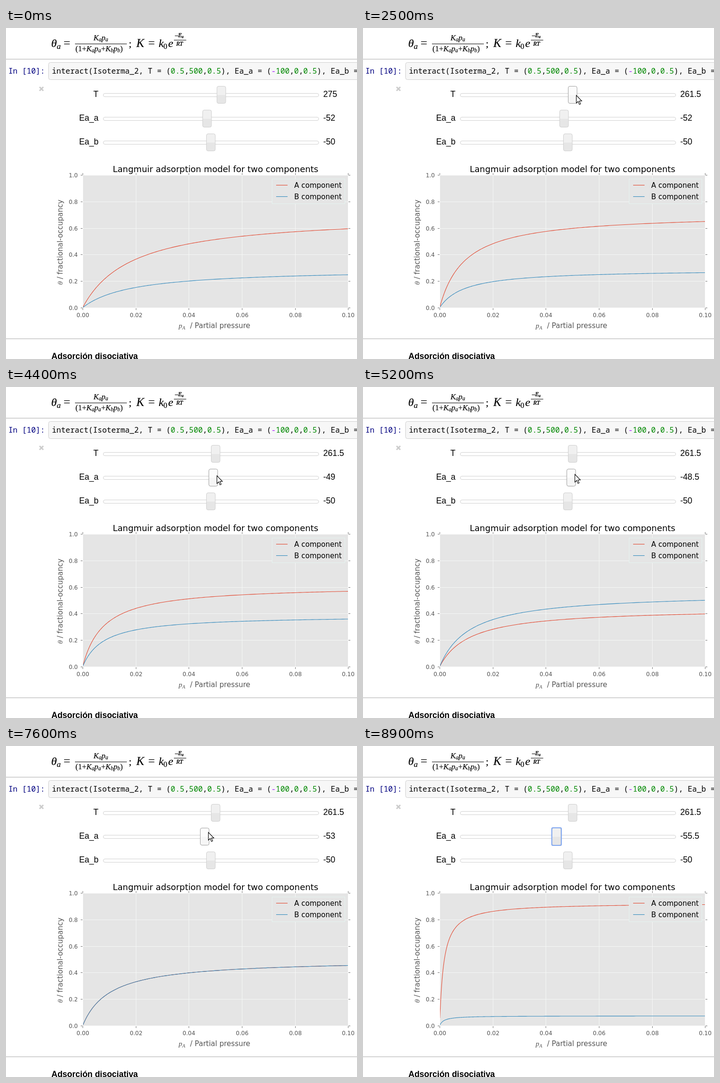
An HTML page for the animation above (9300 ms loop, 738x696 px).

```html
<!DOCTYPE html>
<html lang="es">
<head>
<meta charset="utf-8">
<title>Langmuir adsorption</title>
<style>
html, body { margin: 0; width: 100%; height: 100%; overflow: hidden; background: #fff; }
svg { display: block; width: 738px; height: 696px; }
text { white-space: pre; }
.math { font-family: "Liberation Serif", serif; }
.math .i, .math.i { font-style: italic; }
.math .sub { font-size: 70%; }
.code { font: 16.03px "Noto Sans Mono", monospace; }
.num { fill: #080; }
.op { fill: #a2f; }
.ui { font: 17.5px "Liberation Sans", sans-serif; }
.plot { font-family: "DejaVu Sans", sans-serif; fill: #555; }
.tick { font-size: 12px; }
.name { font-size: 15px; }
.grid { stroke: #f5f7f6; }
.mark { stroke: #777; }
.curve { fill: none; stroke-width: 1.1; stroke-linejoin: round; }
.red { stroke: #e24a33; }
.blue { stroke: #348abd; }
.track { fill: #fff; stroke: #d0d0d0; }
.knob .top { fill: #f0f0f0; }
.knob .low { fill: #e6e6e6; }
.knob .edge { fill: none; stroke: #cfcfcf; }
.knob .ring { fill: none; stroke: #7fa6f0; stroke-width: 2; visibility: hidden; }
.hover .top { fill: #fcfcfc; }
.hover .low { fill: #f6f6f6; }
.hover .edge { stroke: #a0a0a0; }
.focus .ring { visibility: visible; }
</style>
</head>
<body>
<svg viewBox="0 0 738 696">
  <clipPath id="area"><rect x="162" y="310" width="557" height="278"/></clipPath>

  <g class="math" stroke="#000" stroke-width=".15">
    <text x="95" y="40" font-size="24" class="i">θ<tspan class="sub" dy="4">a</tspan></text>
    <text x="121" y="40" font-size="25">=</text>
    <text x="184" y="26" font-size="16.5" class="i">K<tspan class="sub" dy="2">a</tspan><tspan dy="-2">p</tspan><tspan class="sub" dy="2">a</tspan></text>
    <path d="M145 33.5H254" stroke-width="1.2"/>
    <text x="146" y="49" font-size="16.5">(1+<tspan class="i">K<tspan class="sub" dy="2">a</tspan><tspan dy="-2">p</tspan><tspan class="sub" dy="2">a</tspan></tspan><tspan dy="-2">+</tspan><tspan class="i">K<tspan class="sub" dy="2">b</tspan><tspan dy="-2">p</tspan><tspan class="sub" dy="2">b</tspan></tspan><tspan dy="-2">)</tspan></text>
    <text x="258" y="40" font-size="22">;</text>
    <text x="274" y="40" font-size="25" class="i">K</text>
    <text x="299" y="40" font-size="25">=</text>
    <text x="321" y="40" font-size="24" class="i">k</text>
    <text x="331" y="44" font-size="16">0</text>
    <text x="341" y="40" font-size="24" class="i">e</text>
    <path d="M355 16.5H362M353 25.5H379" stroke-width="1"/>
    <text x="362" y="19" font-size="12" class="i" stroke-width=".4">E<tspan class="sub" dy="2">a</tspan></text>
    <text x="358" y="37" font-size="12" class="i" stroke-width=".4">RT</text>
  </g>

  <path d="M0 65.5H738M0 653.5H738" stroke="#ababab"/>
  <rect x="89.5" y="72.5" width="680" height="36" rx="4" fill="#f7f7f7" stroke="#cfcfcf"/>
  <text class="code" x="5" y="96" fill="#000080">In [10]:</text>
  <text class="code" x="96.5" y="96">interact(Isoterma_2, T = (<tspan class="num">0.5</tspan>,<tspan class="num">500</tspan>,<tspan class="num">0.5</tspan>), Ea_a = (<tspan class="op">-</tspan><tspan class="num">100</tspan>,<tspan class="num">0</tspan>,<tspan class="num">0.5</tspan>), Ea_b =</text>
  <path d="M70.5 124L78.5 132M78.5 124L70.5 132" stroke="#ccc" stroke-width="3"/>

  <g id="sliders"></g>

  <g class="plot">
    <text x="440.5" y="303" font-size="17.9" text-anchor="middle" fill="#000">Langmuir adsorption model for two components</text>
    <rect x="162" y="310" width="557" height="278" fill="#e5e5e5"/>
    <g id="axes"></g>
    <text x="363" y="631" class="math i" font-size="15">p<tspan class="sub" dy="3">A</tspan></text>
    <text x="387" y="631" class="name">/ Partial pressure</text>
    <g transform="translate(119 540) rotate(-90)">
      <text class="math i" font-size="15">θ</text>
      <text x="12" class="name">/ fractional-occupancy</text>
    </g>
    <g clip-path="url(#area)">
      <path id="curveA" class="curve red"/>
      <path id="curveB" class="curve blue"/>
    </g>
    <rect x="559.5" y="317.5" width="153" height="52" fill="#e5e5e5" stroke="#e6f3f0"/>
    <path class="curve red" d="M568 330.5H592"/>
    <path class="curve blue" d="M568 354.5H592"/>
    <g class="name" fill="#000">
      <text x="606" y="336">A component</text>
      <text x="606" y="360">B component</text>
    </g>
  </g>

  <text class="ui" x="95.5" y="696" style="font-weight:bold">Adsorción disociativa</text>
  <path id="cursor" d="M0 0V16.5L3.8 13L6.4 19.4L9 18.3L6.4 12H11.5Z" fill="#fff" stroke="#000" stroke-width="1.1"/>
</svg>
<script>
const LOOP = 9300, STEP = 100, R = 8.314e-3, K0 = 5e-9;
const PLOT = { x: 161.2, y: 588, w: 558, h: 279 };
const $ = id => document.getElementById(id);

const clamp = (v, lo, hi) => Math.min(hi, Math.max(lo, v));
const half = v => Math.round(v * 2) / 2;
const mix = (a, b, u) => a + (b - a) * u;
const ramp = (t, from, to) => clamp((t - from) / (to - from), 0, 1);
const easeOut = u => 1 - (1 - u) ** 2;

// Slider values
const temperature = t => half(mix(275, 261.5, ramp(t, 970, 1875)));
const energy = t => half(-52 + 3.5 * easeOut(ramp(t, 3600, 5000)) - 7 * ramp(t, 6600, 8156));

// The plot trails the sliders: three slow redraws, then queued half-unit steps
const plotTemperature = t => [275, 271.5, 267, 261.5][clamp(Math.floor((t - 800) / 700), 0, 3)];
const plotEnergy = t => -52
  + clamp(Math.floor((t - 3900) / 250), 0, 7) / 2
  - clamp(Math.floor((t - 7200) / 115), 0, 14) / 2;

const temperatureX = v => Math.round(443 + (v - 275) * .907);
const energyX = v => Math.round(412.6 + (v + 52) * 4.53);

// The pointer holds a handle while dragging and glides in between
function pointer(t) {
  const onT = [temperatureX(temperature(t)) + 16, 141];
  const onEa = [energyX(energy(t)) + 17.5, 189 - 8 * easeOut(ramp(t, 3600, 7600))];
  const glide = (a, b, from, to) => a.map((v, i) => mix(v, b[i], ramp(t, from, to)));
  const rest = [457, 142];
  if (t < 1000) return glide([602, 83], onT, 200, 900);
  if (t < 3200) return glide(onT, rest, 2400, 3000);
  if (t < 3600) return glide(rest, onEa, 3200, 3600);
  return glide(onEa, [721, 71], 8500, 8800);
}

const slider = (id, y) => `
  <text class="ui" x="194.5" y="${y + 4}" text-anchor="end">${id}</text>
  <rect class="track" x="204.5" y="${y - 3.5}" width="453" height="7" rx="3.5"/>
  <g id="${id}" class="knob">
    <rect class="top" x=".5" y="${y - 18.5}" width="18.5" height="36" rx="3"/>
    <rect class="low" x="1" y="${y}" width="17.5" height="17"/>
    <rect class="edge" x=".5" y="${y - 18.5}" width="18.5" height="36" rx="3.5"/>
    <rect class="ring" x="0" y="${y - 19}" width="20" height="37" rx="2"/>
  </g>
  <text class="ui" id="${id}_value" x="667" y="${y + 4}"></text>`;
$("sliders").innerHTML = slider("T", 141) + slider("Ea_a", 191) + slider("Ea_b", 241);

let axes = "";
for (let i = 0; i <= 5; i++) {
  const x = Math.round(PLOT.x + PLOT.w * i / 5) + .5;
  const y = Math.round(PLOT.y - PLOT.h * i / 5) + .5;
  if (i % 5) axes += `<path class="grid" d="M${x} 310V588M162 ${y}H719"/>`;
  axes += `<path class="mark" d="M${x} 305V309M${x} 589V593M157 ${y}H161M720 ${y}H724"/>
    <text class="tick" x="${x}" y="608" text-anchor="middle">${(i / 50).toFixed(2)}</text>
    <text class="tick" x="151" y="${y + 4}" text-anchor="end">${(i / 5).toFixed(1)}</text>`;
}
$("axes").innerHTML = axes;

function setSlider(id, value, x, hover, focus) {
  const knob = $(id);
  knob.setAttribute("transform", `translate(${x})`);
  knob.classList.toggle("hover", hover);
  knob.classList.toggle("focus", focus);
  $(id + "_value").textContent = value;
}

function drawCurves(temp, energyA) {
  const rate = e => K0 * Math.exp(-e / (R * temp));
  const ka = rate(energyA), kb = rate(-50);
  const trace = k => {
    let d = "";
    for (let i = 0; i <= 200; i++) {
      const p = 1e-4 + .0999 * (i / 200) ** 2;
      const theta = k * p / (1 + (ka + kb) * p);
      d += (i ? "L" : "M") + (PLOT.x + PLOT.w * p * 10).toFixed(2) + " " + (PLOT.y - PLOT.h * theta).toFixed(2);
    }
    return d;
  };
  $("curveA").setAttribute("d", trace(ka));
  $("curveB").setAttribute("d", trace(kb));
}

function render(t) {
  const temp = temperature(t), ea = energy(t);
  setSlider("T", temp, temperatureX(temp), t >= 900 && t < 2600, t >= 2600 && t < 3600);
  setSlider("Ea_a", ea, energyX(ea), t >= 3600 && t < 8600, t >= 8600);
  setSlider("Ea_b", -50, 421, false, false);
  drawCurves(plotTemperature(t), plotEnergy(t));
  const [x, y] = pointer(t).map(v => Math.floor(v) + .5);
  $("cursor").setAttribute("transform", `translate(${x} ${y})`);
  $("cursor").setAttribute("visibility", t >= 200 && t < 8900 ? "visible" : "hidden");
}

const start = performance.now();
let last = -1;
function tick() {
  const t = Math.floor((performance.now() - start) % LOOP / STEP) * STEP;
  if (t !== last) render(last = t);
  requestAnimationFrame(tick);
}
tick();
</script>
</body>
</html>
```
